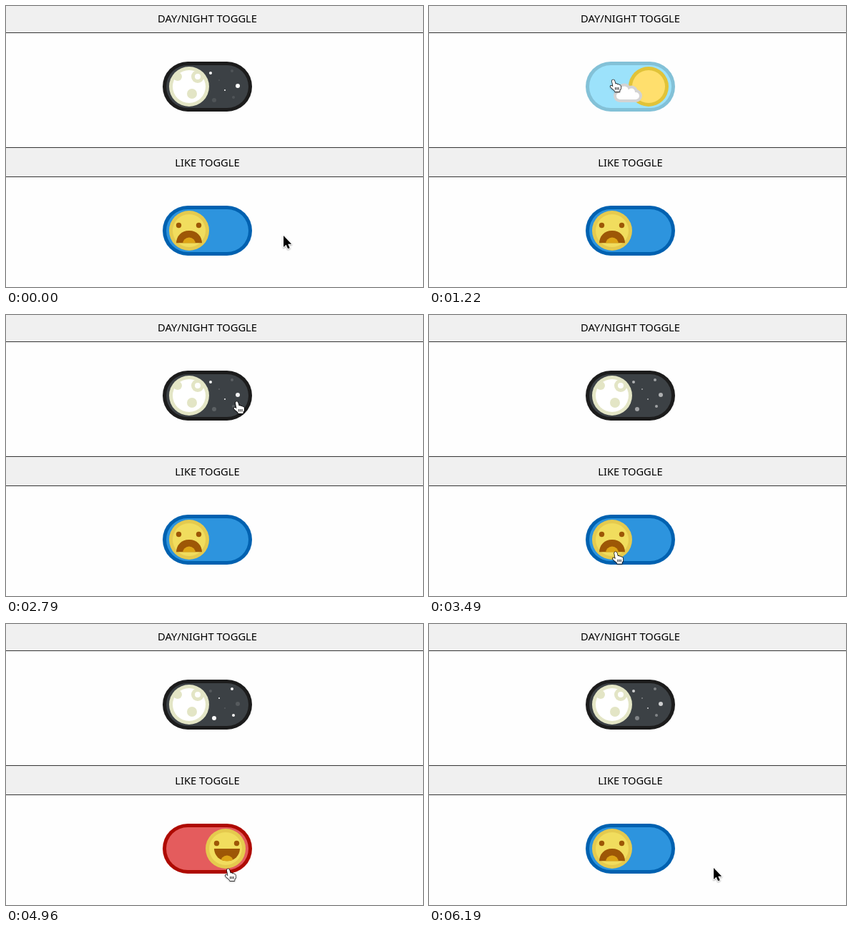
Animation, 583 px wide and 394 px high, one loop 8.19 s. Source, as an HTML page with a canvas:

```html
<!DOCTYPE html>
<html lang="en">
<head>
<meta charset="utf-8">
<title>Toggles</title>
<style>
  html, body { margin: 0; width: 100%; height: 100%; overflow: hidden; background: #fefefe; }
  h2 {
    position: absolute; left: 0; width: 583px; height: 42px; margin: 0;
    box-sizing: border-box; padding-right: 20px;
    border: solid #333; border-width: 1px 0; background: #f0f0f0; color: #000;
    font: 500 14.7px/40px "Noto Sans", "Open Sans", sans-serif; text-align: center;
  }
  canvas { position: absolute; left: 0; top: 0; }
</style>
</head>
<body>
<h2 style="top:-4px">DAY/NIGHT TOGGLE</h2>
<h2 style="top:198px">LIKE TOGGLE</h2>
<canvas width="583" height="394"></canvas>
<script>
const ctx = document.querySelector('canvas').getContext('2d');
const LOOP = 8190, LAST_MOVE = 6190, SWITCH_MS = 400;
const DAY_ON = 770, DAY_OFF = 2270, LIKE_ON = 3775, LIKE_OFF = 5150;

const clamp = u => Math.min(1, Math.max(0, u));
const lerp = (a, b, u) => a + (b - a) * u;
const easeOut = u => 1 - (1 - clamp(u)) ** 2.3;
const easeInOut = u => u * u * (3 - 2 * u);
const channels = hex => [1, 3, 5].map(i => parseInt(hex.slice(i, i + 2), 16));
const mix = (from, to, u) => {
  const end = channels(to);
  return `rgb(${channels(from).map((c, i) => Math.round(lerp(c, end[i], u)))})`;
};
const switched = (t, on, off) =>
  easeOut((t - on) / SWITCH_MS) - easeOut((t - off) / SWITCH_MS);

function disc(x, y, r, color) {
  ctx.fillStyle = color;
  ctx.beginPath();
  ctx.arc(x, y, r, 0, 2 * Math.PI);
  ctx.fill();
}

function box(x, y, w, h, radii, color) {
  ctx.fillStyle = color;
  ctx.beginPath();
  ctx.roundRect(x, y, w, h, radii);
  ctx.fill();
}

function track(y, border, fill) {
  box(219, y, 125, 70, 35, border);
  box(224, y + 5, 115, 60, 30, fill);
}

function knob(x, y, border, fill) {
  disc(x, y, 28, border);
  disc(x, y, 23, fill);
}

// x, y, radius, and whether the star starts out bright
const stars = [
  [286, 94, 2, 1], [324, 112, 3, 1], [306, 118, 1, 1],
  [316, 91, 2, 0], [298, 104, 1, 0], [291, 132, 3, 0], [318, 128, 2, 0]
];

function drawStars(t, alpha) {
  const phase = t < DAY_OFF ? 0 : Math.max(0, t - 2400) / 2300;
  const swap = easeInOut(phase > 1 ? 2 - phase : phase);
  for (const [x, y, r, bright] of stars) {
    ctx.globalAlpha = alpha * lerp(0.1, 1, bright ? 1 - swap : swap);
    disc(x, y, r, '#ffffff');
  }
  ctx.globalAlpha = 1;
}

function drawCloud(x, alpha) {
  ctx.save();
  ctx.globalAlpha = alpha;
  ctx.translate(x, 0);
  for (const [grow, color] of [[4, '#d3d3d3'], [0, '#ffffff']]) {
    box(264 - grow, 121 - grow, 32 + 2 * grow, 10 + 2 * grow, 5 + grow, color);
    disc(275, 118.5, 6 + grow, color);
    disc(285, 120.5, 5 + grow, color);
  }
  ctx.restore();
}

function drawDayNight(t) {
  const p = switched(t, DAY_ON, DAY_OFF);
  const x = lerp(256, 307, p);
  track(78, mix('#1c1c1c', '#83c1d7', p), mix('#3c4145', '#9ce2fb', p));
  drawStars(t, 1 - p);
  knob(x, 113, mix('#e3e5c5', '#e1c338', p), mix('#ffffff', '#ffdf6d', p));
  ctx.globalAlpha = 1 - p;
  disc(x - 16, 99, 6, '#e3e5c5');
  disc(x + 12, 99, 9, '#e3e5c5');
  disc(x + 12, 99, 4, '#ffffff');
  disc(x + 4, 123, 7, '#e3e5c5');
  ctx.globalAlpha = 1;
  drawCloud(-10 * (1 - easeOut((t - DAY_ON) / 900)), p);
}

function drawLike(t) {
  const p = switched(t, LIKE_ON, LIKE_OFF);
  const face = lerp(256, 309, p);
  track(280, mix('#0061b0', '#ae0a02', p), mix('#2d94de', '#e45c5d', p));
  knob(lerp(256, 307, p), 315, '#e5ca4e', '#f1dd5e');
  disc(face - 14.5, 307.5, 3.7, '#9d5706');
  disc(face + 13.5, 307.5, 3.7, '#9d5706');
  const top = 18 * (1 - p), bottom = 18 * p;
  ctx.save();
  box(face - 18, 315, 36, 17.3, [top, top, bottom, bottom], '#9d5706');
  ctx.clip();
  box(face - 9, 324.5, 18, 9, [9, 9, 0, 0], '#dda416');
  ctx.restore();
}

// time, x, y of the pointer tip
const pointerPath = [
  [80, 388, 322], [680, 258, 103], [1250, 258, 103], [1740, 331, 121],
  [1920, 323, 121], [2800, 323, 121], [3600, 258, 343], [4050, 258, 343],
  [4800, 311, 343], [5640, 311, 343], [6190, 398, 342]
];
const arrow = new Path2D('M0 0V16L3.6 12.7L6.1 18.3L8.7 17.2L6.2 11.8H11.2Z');
const hand = new Path2D('M-2.2 2Q-2 .2 -.3 .3Q1 .4 1.4 2L2.8 6.4Q4.4 5.4 5.4 7' +
  'Q7 6.2 7.8 7.8Q9.6 7.4 9.9 9.2L10 13L8.5 15V17H2L1 15L-2 12.8L-4.3 10.4' +
  'Q-4.8 8.4 -2.8 8.8L-.6 10.2Z');
const fingers = new Path2D('M2.6 11V14.5M4.8 11V14.5M7 11V14.5');

function pointerAt(t) {
  const next = pointerPath.findIndex(point => t < point[0]);
  if (next === 0) return pointerPath[0].slice(1);
  if (next < 0) return pointerPath.at(-1).slice(1);
  const [t0, x0, y0] = pointerPath[next - 1], [t1, x1, y1] = pointerPath[next];
  const u = easeInOut((t - t0) / (t1 - t0));
  return [lerp(x0, x1, u), lerp(y0, y1, u)];
}

function drawPointer(t) {
  const [x, y] = pointerAt(t);
  const overToggle = x > 219 && x < 344 && [78, 280].some(top => y > top && y < top + 70);
  ctx.save();
  ctx.translate(x, y);
  ctx.lineJoin = 'round';
  ctx.lineWidth = overToggle ? 1.3 : 2;
  ctx.strokeStyle = overToggle ? '#000' : '#fff';
  ctx.fillStyle = overToggle ? '#fff' : '#000';
  ctx.shadowColor = 'rgba(0,0,0,.35)';
  ctx.shadowBlur = 2;
  ctx.shadowOffsetY = 1;
  const shape = overToggle ? hand : arrow;
  ctx.stroke(shape);
  ctx.shadowColor = 'transparent';
  ctx.fill(shape);
  if (overToggle) {
    ctx.lineWidth = 0.9;
    ctx.stroke(fingers);
  }
  ctx.restore();
}

const start = performance.now();
function draw() {
  const t = Math.min((performance.now() - start) % LOOP, LAST_MOVE);
  ctx.clearRect(0, 0, 583, 394);
  drawDayNight(t);
  drawLike(t);
  drawPointer(t);
  requestAnimationFrame(draw);
}
draw();
</script>
</body>
</html>
```
